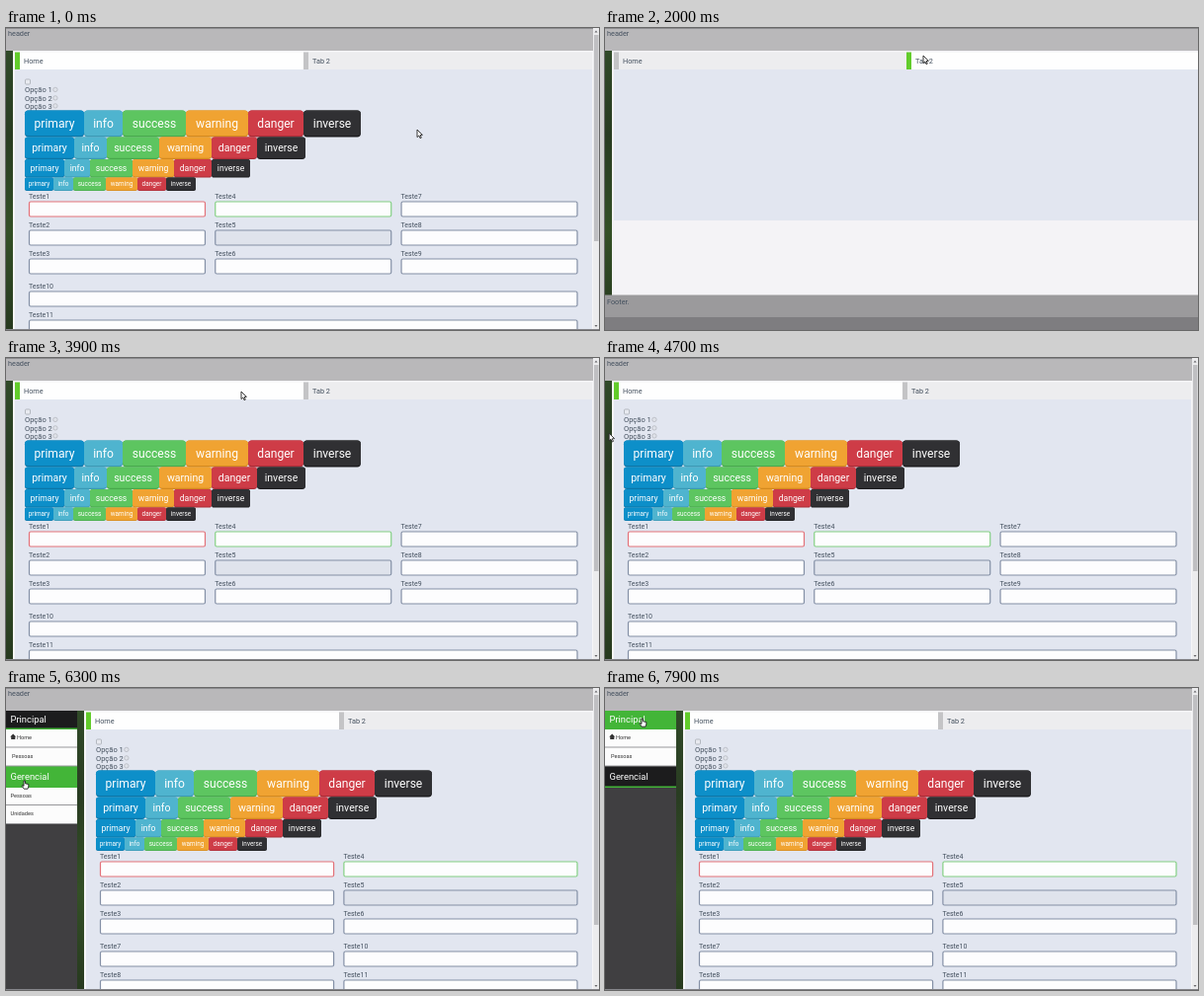
Animation of 600x306 px, one loop 8000 ms. Source, as an HTML page with a canvas:

```html
<!DOCTYPE html>
<html lang="pt">
<head>
<meta charset="utf-8">
<title>Menu and tabs</title>
<style>
html, body { margin: 0; width: 100%; height: 100%; overflow: hidden; background: #b9b8ba; }
canvas { display: block; width: 600px; height: 306px; }
</style>
</head>
<body>
<canvas id="stage"></canvas>
<script>
const W = 600, H = 306, LOOP = 8000, STEP = 100;
const MENU_W = 72, OPEN_AT = 4720, OPEN_MS = 500, FOLD_AT = 6600, FOLD_MS = 400;
const TAB2_AT = 1900, HOME_AT = 3200;
const canvas = document.getElementById('stage');
const dpr = window.devicePixelRatio || 1;
canvas.width = W * dpr;
canvas.height = H * dpr;
const ctx = canvas.getContext('2d');

const INK = '#44505e', GREEN = '#43b538', LIME = '#62cc2b', PANE = '#e2e6f0';
const BUTTONS = [
  ['primary', '#0d8fc9', '#0b76a8'],
  ['info', '#4fb4cf', '#3b99b5'],
  ['success', '#5dc560', '#48a94c'],
  ['warning', '#f0a332', '#d58a1e'],
  ['danger', '#ce3c47', '#ab2c37'],
  ['inverse', '#303033', '#1d1d1f']
];
// top, height, font size, right edges measured from the row's left
const BUTTON_ROWS = [
  [83.5, 27, 12.1, [60, 99, 163, 226, 282, 340]],
  [110.5, 22.5, 10.5, [50, 83, 136, 189, 235, 284]],
  [133, 18.5, 8.6, [40, 66, 109, 151, 189, 228]],
  [151.5, 13.5, 6.4, [29, 49, 82, 114, 143, 173]]
];
const ROW_Y = [176, 205, 234, 267, 296];
// time, x, y of the pointer
const POINTER = [
  [0, 416, 103], [1000, 416, 103], [1700, 322, 28], [2600, 322, 28],
  [3100, 238, 34], [4000, 238, 34], [4600, 4, 76], [5000, 5, 78],
  [5500, 8, 80], [6000, 18, 94], [7000, 18, 94], [7500, 37, 31], [8000, 37, 31]
];

const clamp = v => Math.max(0, Math.min(1, v));
const smooth = v => v * v * (3 - 2 * v);

// cubic-bezier(.25, .1, .25, 1)
function ease(x) {
  let lo = 0, hi = 1;
  const curve = (u, a, b) => 3 * u * (1 - u) * (1 - u) * a + 3 * u * u * (1 - u) * b + u * u * u;
  for (let i = 0; i < 20; i++) {
    const mid = (lo + hi) / 2;
    if (curve(mid, .25, .25) < x) lo = mid; else hi = mid;
  }
  return curve(lo, .1, 1);
}

function pointerAt(t) {
  let i = 0;
  while (i < POINTER.length - 2 && t >= POINTER[i + 1][0]) i++;
  const [t0, x0, y0] = POINTER[i], [t1, x1, y1] = POINTER[i + 1];
  const k = smooth(clamp((t - t0) / (t1 - t0)));
  return [x0 + (x1 - x0) * k, y0 + (y1 - y0) * k];
}

function rect(x, y, w, h, fill) {
  ctx.fillStyle = fill;
  ctx.fillRect(x, y, w, h);
}

function round(x, y, w, h, r, fill, stroke, line = 1) {
  ctx.beginPath();
  ctx.roundRect(x, y, w, h, r);
  if (fill) { ctx.fillStyle = fill; ctx.fill(); }
  if (stroke) { ctx.strokeStyle = stroke; ctx.lineWidth = line; ctx.stroke(); }
}

function text(str, x, y, size, fill = INK, align = 'left') {
  ctx.font = `${size}px Roboto, sans-serif`;
  ctx.textAlign = align;
  ctx.textBaseline = 'alphabetic';
  ctx.fillStyle = fill;
  ctx.fillText(str, x, y + size * .35);
}

function shape(points, x, y, fill, stroke) {
  ctx.beginPath();
  for (const [dx, dy] of points) ctx.lineTo(x + dx, y + dy);
  ctx.closePath();
  ctx.fillStyle = fill;
  ctx.fill();
  if (!stroke) return;
  ctx.strokeStyle = stroke;
  ctx.lineWidth = .9;
  ctx.lineJoin = 'round';
  ctx.stroke();
}

function drawTab(label, x, w, active) {
  rect(x, 24.5, w, 17.5, active ? '#fefefe' : '#ededef');
  rect(x, 24.5, 5, 17.5, active ? LIME : '#c4c4c6');
  text(label, x + 9, 33, 7.3);
}

function drawTabs(left, right, second) {
  const half = Math.round((right - left) / 2);
  drawTab('Home', left, half, !second);
  drawTab('Tab 2', left + half, right - left - half, second);
}

function drawBackdrop(left) {
  rect(0, 0, W, H, '#f4f4f6');
  const g = ctx.createLinearGradient(0, 23, 0, H);
  g.addColorStop(0, '#304a28');
  g.addColorStop(.3, '#293c22');
  g.addColorStop(.65, '#345026');
  g.addColorStop(1, '#27391f');
  rect(0, 23, left - 2, H - 23, g);
  rect(0, 0, W, 23, '#b9b8ba');
  rect(0, 0, W, 1, '#8d8d90');
  text('header', 2, 5.7, 7.3);
}

function drawButtons(x) {
  for (const [y, h, size, edges] of BUTTON_ROWS) {
    let from = 0;
    BUTTONS.forEach(([label, fill, shade], i) => {
      const w = edges[i] - from, r = size * .3;
      round(x + from, y, w, h, r, shade);
      round(x + from, y, w, h - size / 8, r, fill);
      text(label, x + from + w / 2, y + h * .49, size, '#fff', 'center');
      from = edges[i];
    });
  }
}

function drawField(n, x, row, w) {
  const y = ROW_Y[row];
  const line = n === 1 ? '#e3727a' : n === 4 ? '#84d084' : '#8490a6';
  text('Teste' + n, x, y - 5.3, 7);
  round(x + .5, y, w - 1, 15, 1.5, n === 5 ? '#dfe3ec' : '#fdfdfe', line, 1.2);
}

function drawForm(left, twoCols) {
  const x = left + 14, full = 578.5 - x, cols = twoCols ? 2 : 3;
  const pitch = (full + 9.3) / cols, w = pitch - 9.3;
  for (let n = 1; n <= 3 * cols; n++)
    drawField(n, x + Math.floor((n - 1) / 3) * pitch, (n - 1) % 3, w);
  for (let row = 3; row < 5; row++) {
    if (twoCols) {
      drawField(row + 4, x, row, w);
      drawField(row + 7, x + pitch, row, w);
    } else {
      drawField(row + 7, x, row, full);
    }
  }
}

function drawScrollbar(thumb) {
  rect(594, 0, 6, H, '#ececee');
  rect(595, 7, 4.5, thumb, '#bfbfc2');
  shape([[-1.5, 0], [1.5, 0], [0, -2]], 597, 4.5, '#66666a');
  shape([[-1.5, 0], [1.5, 0], [0, 2]], 597, 301, '#66666a');
}

function drawHome(left, twoCols) {
  rect(left - 2, 23, 596 - left, H - 23, '#f6f6f8');
  rect(left, 42, 593 - left, H - 42, PANE);
  drawTabs(left, 593, false);
  const x = left + 10;
  round(x + .5, 52, 5, 5, 1, '#e8eaf0', '#a8acb4', .8);
  [62.5, 71, 79].forEach((y, i) => {
    text('Opção ' + (i + 1), x, y, 7.5);
    round(x + 28.7, y - 2.3, 4.4, 4.4, 2.2, '#dfe2e9', '#b6b9c1', .8);
  });
  drawButtons(x);
  drawForm(left, twoCols);
  drawScrollbar(twoCols ? 233 : 209);
  rect(0, 305, W, 1, '#85858a');
}

function drawSecond(left) {
  rect(left - 2, 23, W, 248, '#f4f3f6');
  rect(left, 42, W - left, 153, PANE);
  drawTabs(left, W, true);
  rect(0, 270.5, W, 23, '#9b9a9c');
  rect(0, 293, W, 13, '#7e7d80');
  text('Footer.', 2, 277, 7.3);
}

function menuHead(label, y, h, w, hot) {
  rect(0, y, w, h, hot ? GREEN : '#1c1c1d');
  rect(0, y + h - 1.5, w, 1.5, GREEN);
  text(label, 4.5, y + h / 2 - .5, 9.4, '#fff');
}

function menuItem(label, x, y, h, w, hot) {
  rect(0, y, w, h, hot ? '#f1f1f2' : '#fcfcfc');
  rect(0, y + h - 1, w, 1, '#98989b');
  text(label, x, y + h / 2 - 1, 5.6, '#333');
}

function drawHouse(x, y) {
  shape([[-.3, .2], [2.7, -2.8], [5.7, .2], [4.8, .2], [4.8, 2.5], [.7, 2.5], [.7, .2]], x, y, '#333');
}

function drawMenu(w, fold, py) {
  const over = (a, b) => py >= a && py < b;
  ctx.save();
  ctx.beginPath();
  ctx.rect(0, 23, w, H - 24);
  ctx.clip();
  rect(0, 23, w, H, '#403f41');
  ctx.translate(0, -1);
  menuHead('Principal', 23, 20, w, over(22, 42));
  menuItem('Home', 11, 43, 18.5, w, over(42, 60));
  drawHouse(4.5, 50.4);
  menuItem('Pessoas', 6, 61.5, 19, w, over(60, 80));
  menuHead('Gerencial', 80.5, 21.5, w, over(80.5, 101));
  ctx.beginPath();
  ctx.rect(0, 102, w, 37 * (1 - fold));
  ctx.clip();
  menuItem('Pessoas', 4.5, 102, 18, w, false);
  menuItem('Unidades', 4.5, 120, 19, w, false);
  ctx.restore();
}

function drawArrow(x, y) {
  shape([[0, 0], [0, 7.6], [1.8, 6], [3, 8.7], [4.3, 8.1], [3.1, 5.5], [5.4, 5.3]], x, y, '#fff', '#222');
}

function drawHand(x, y) {
  shape([[0, 0], [1.4, 0], [1.5, 2.8], [4.8, 3.5], [4.8, 6], [4, 8.2], [.2, 8.2], [-2, 5.2], [-1.5, 4.4], [0, 5.4]],
    x, y, '#fff', '#222');
}

function draw(t) {
  ctx.setTransform(dpr, 0, 0, dpr, 0, 0);
  const [px, py] = pointerAt(t);
  const open = t > OPEN_AT;
  const menu = open ? Math.round(MENU_W * ease(clamp((t - OPEN_AT) / OPEN_MS))) : 0;
  const left = 9 + menu;
  drawBackdrop(left);
  if (t >= TAB2_AT && t < HOME_AT) drawSecond(left);
  else drawHome(left, open);
  if (open) drawMenu(menu, smooth(clamp((t - FOLD_AT) / FOLD_MS)), py);
  if (open && px < menu) drawHand(px, py);
  else drawArrow(px, py);
}

const start = performance.now();
function tick() {
  const t = (performance.now() - start) % LOOP;
  draw(Math.floor(t / STEP) * STEP);
  requestAnimationFrame(tick);
}
tick();
</script>
</body>
</html>
```
